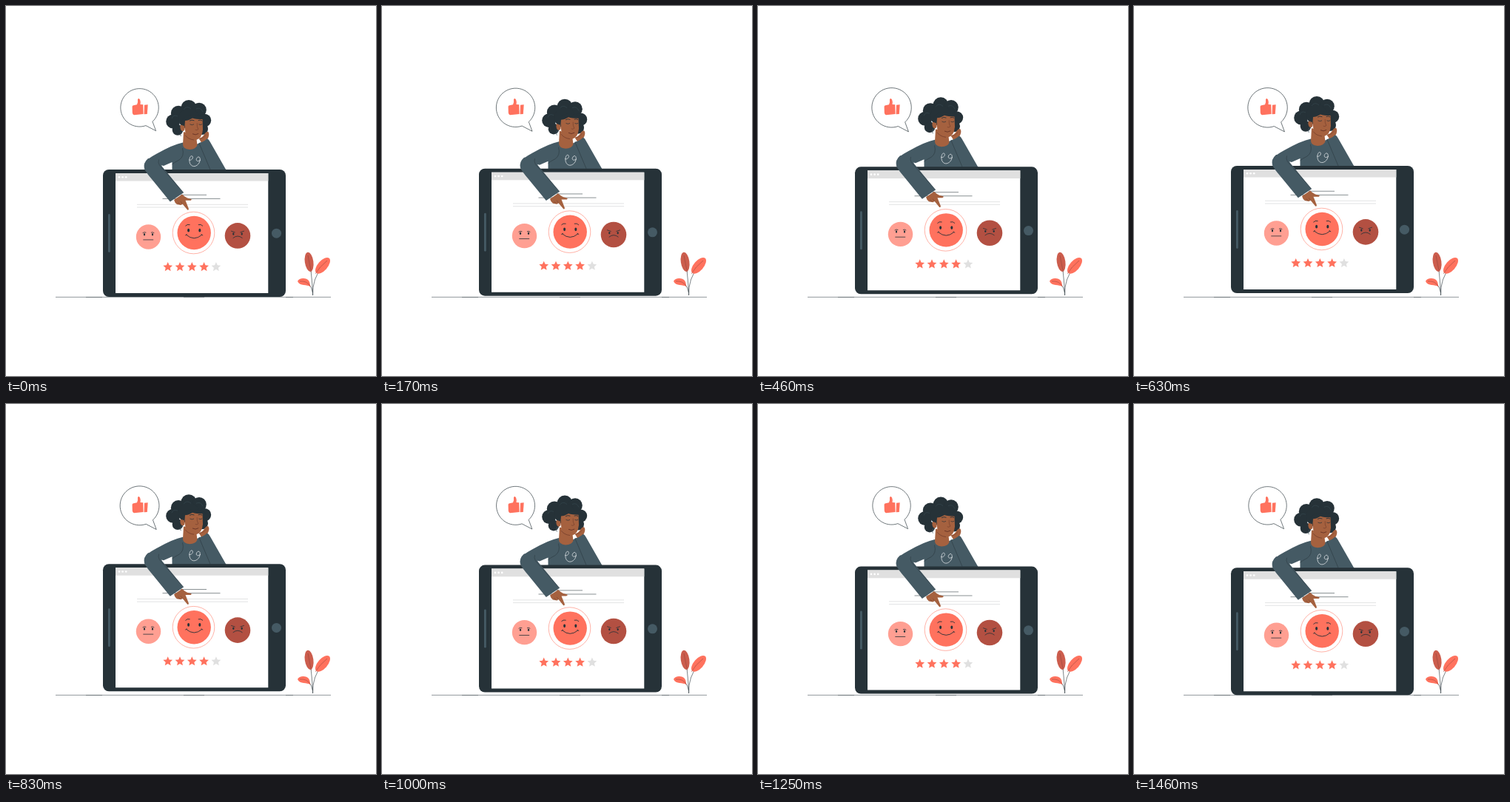
These frames come from a looping animation (500 px wide and 500 px high, 1.5 s). An HTML page with a canvas:

```html
<!DOCTYPE html>
<html lang="en">
<head>
<meta charset="utf-8">
<title>Feedback</title>
<style>
  html, body { margin: 0; width: 100%; height: 100%; overflow: hidden; background: #fff; }
  canvas { display: block; width: 500px; height: 500px; }
</style>
</head>
<body>
<canvas id="stage" width="500" height="500"></canvas>
<script>
const ctx = document.getElementById('stage').getContext('2d');
const LOOP = 1500, LIFT = 6;
const DARK = '#263238', SLATE = '#455a64', CORAL = '#ff725e', PALE = '#ff9f92',
      RUST = '#b35042', SKIN = '#a5613f', GREY = '#e0e0e0';

function fill(d, color) {
  ctx.fillStyle = color;
  ctx.fill(new Path2D(d));
}

function stroke(d, color = DARK, width = 0.6) {
  ctx.strokeStyle = color;
  ctx.lineWidth = width;
  ctx.stroke(new Path2D(d));
}

function ellipse(x, y, rx, ry, color, angle = 0) {
  ctx.beginPath();
  ctx.ellipse(x, y, rx, ry, angle * Math.PI / 180, 0, 2 * Math.PI);
  ctx.fillStyle = color;
  ctx.fill();
}

const disc = (x, y, r, color) => ellipse(x, y, r, r, color);

function roundRect(x, y, w, h, r, color) {
  ctx.beginPath();
  ctx.roundRect(x, y, w, h, r);
  ctx.fillStyle = color;
  ctx.fill();
}

function star(x, y, r, color) {
  ctx.beginPath();
  for (let i = 0; i < 10; i++) {
    const a = i * Math.PI / 5 - Math.PI / 2;
    const d = i % 2 ? r * 0.47 : r;
    ctx.lineTo(x + d * Math.cos(a), y + d * Math.sin(a));
  }
  ctx.closePath();
  ctx.fillStyle = color;
  ctx.fill();
}

function ground() {
  stroke('M67 393.4H439', DARK, 0.5);
  stroke('M108 393.6H130M240 393.6H268M378 393.6H388', DARK, 0.4);
}

function plant() {
  stroke('M414.6 391Q414 372 410.5 345M414.6 391Q413 370 429 349M414.4 387Q412 374 402 372.5', DARK, 0.6);
  ellipse(409.6, 345.8, 5.8, 13.2, '#cc5d4d', -8);
  ellipse(428, 350.8, 6.6, 13.2, CORAL, 41);
  fill('M394 372C396 367 406 367 409 371C411 374 411 377 411 379C407 376 397 379 394 372Z', CORAL);
  stroke('M408 337L412.5 360M434 344Q423 353 418 362M397 372Q407 371 411.5 379', '#8c4238', 0.5);
}

function bubble(scale) {
  ctx.save();
  ctx.translate(180.6, 137.2);
  ctx.scale(scale, scale);
  ctx.translate(-180.6, -137.2);
  const outline = 'M189 161.6A25.7 25.7 0 1 1 198 156.2L202.6 168.7Z';
  fill(outline, '#fff');
  stroke(outline, DARK, 0.65);
  ctx.restore();
  fill('M170.6 136Q170.6 134.4 172.4 134.2L177 133.3Q178.6 131 178 126.5Q178.2 124.8 179.6 125' +
       'Q181.4 125.8 181.7 129Q181.9 131.4 181.5 133L185.3 133.2L185.6 146L173.5 147.2' +
       'Q171 147 170.8 144Z', CORAL);
  fill('M187 133.8L191.7 133.2L190.8 146L186.6 146.3Z', CORAL);
}

function head() {
  const curls = [[247, 137.5, 10.5], [261, 140.5, 9.8], [233, 145, 10.2], [225.7, 156, 9.5],
                 [268.5, 154.5, 8.7], [232, 167.5, 7.3], [265, 166, 8], [247, 152, 14]];
  curls.forEach(([x, y, r]) => disc(x, y, r, DARK));
  fill('M240 170L239 187Q239 193 248 194Q257 193.5 258.5 188L257 176Z', SKIN);
  fill('M241 153Q252 147 265.5 152L266 167Q265 179 257 181Q248 181.5 242.5 174Z', SKIN);
  ellipse(238.5, 164.5, 3, 4.6, SKIN, -10);
  fill('M236 160Q238 148 250 147Q262 146 270 153Q258 153.5 252 151.5Q246 155 242 155Q241.5 161 240 162Z', DARK);
  stroke('M242 174.5Q246 180 254 181', '#703c2a', 0.7);
  stroke('M248 155.2Q251 153.2 254.4 154.8M259.7 154.6Q262.5 153.4 265.2 155', DARK, 0.9);
  stroke('M248.5 159.8Q251.5 161.5 254 159.8M260.5 159.8Q263 161.3 265.2 159.6', DARK, 0.7);
  stroke('M258.2 158Q257.7 163 259.8 166.6Q258 168.5 255.8 167.2', '#703c2a', 0.6);
  stroke('M252 172.7Q256 175.2 260.2 172.4', '#5d2d22', 0.8);
  stroke('M237.2 169.5Q234.8 174 236.5 176', SLATE, 0.8);
  stroke('M224 152Q226 146 232 149M240 140Q244 134 250 139M257 139Q263 136 266 143', SLATE, 0.35);
}

function body() {
  fill('M239 184.5Q248 192.5 258.5 186.5L264 184L298 222.5L224.5 222.5L224.5 211L213 216L190 210' +
       'Q190 207 203 200Q226 187 239 184.5Z', SLATE);
  head();
  fill('M260.5 179Q265 178 268 173.5Q271 168.5 273.5 170.2Q275.5 174 272.5 179.5L265 186Z', SKIN);
  stroke('M262 179.2Q268 178.5 270.5 173.5', '#703c2a', 0.5);
  fill('M260.8 185Q266 184.5 271.8 179.2Q274 180 276 184L298 222.5H276Z', SLATE);
  stroke('M260.8 185L276 221M238.5 192Q241.5 203 234 208Q228 211 224.5 214', DARK, 0.5);
  stroke('M247 207.5C249 210 254 206 251.8 203C248.6 200.8 246.5 209 249 213.5C252 218.5 258 217 261 212' +
         'C263.5 207 262 202.5 259 204.3C255 207.5 258 212 263 208', '#e4e9eb', 0.75);
}

function face(x, y, r, color, features, width) {
  disc(x, y, r, color);
  ctx.save();
  ctx.translate(x, y);
  ctx.lineCap = 'round';
  stroke(features, DARK, width);
  ctx.restore();
}

function eyes(x, y, gap, rx, ry) {
  ellipse(x - gap, y, rx, ry, DARK);
  ellipse(x + gap, y, rx, ry, DARK);
}

function tablet() {
  roundRect(131, 221, 247, 172, 8, DARK);
  roundRect(148, 226, 206.3, 162, 0, '#fff');
  roundRect(148, 226, 206.3, 10.6, 0, GREY);
  [153, 157.6, 162.2].forEach(x => disc(x, 231.3, 1.3, '#fff'));
  roundRect(138, 281, 2.8, 52, 1.4, SLATE);
  disc(365.5, 307.2, 6.5, SLATE);

  stroke('M236 255.3H271M211.5 260.4H289.5', DARK, 0.55);
  stroke('M177 268.3H327M177 272H327', DARK, 0.14);

  face(192.5, 312, 16.7, PALE, 'M-6.8 3.9H6.3M-7.6 -5.5Q-6 -7 -3.5 -6M3.8 -6Q6 -7 7.5 -5.5', 0.8);
  eyes(192.5, 308.7, 5.5, 1.1, 1.8);
  face(313, 310.4, 17.3, RUST, 'M-6 3Q0 -2 6.2 3M-8.5 -6.2L-3.8 -4.6M3.8 -4.6L8.5 -6.2', 0.8);
  eyes(313, 308, 5.7, 1.1, 1.7);
  face(254.2, 306.5, 22.7, CORAL,
       'M-10.5 2.8Q0 12 10.5 2.8M-11.6 3.3L-9.7 2.2M9.7 2.2L11.6 3.3M-11.5 -9.5Q-9.5 -12 -6 -11M6 -11Q9.5 -12 11.5 -9.5', 0.9);
  eyes(254.2, 303.2, 7.6, 1.5, 2.4);
  ctx.beginPath();
  ctx.arc(253.5, 306.5, 28.3, 0, 2 * Math.PI);
  ctx.strokeStyle = CORAL;
  ctx.lineWidth = 0.55;
  ctx.stroke();

  for (let i = 0; i < 5; i++) star(218.7 + i * 16.3, 352.7, 6.7, i < 4 ? CORAL : GREY);
}

function pointingArm() {
  fill('M227 262L238 254.5Q241 257.5 245 259.5L250.5 261Q251.2 262.8 248.5 262.8L242.5 262.8' +
       'Q244.2 267 246.9 274Q247 276.3 245.2 275.6L238.5 267.5L236.5 269L231 268Q228 266 227 262Z', SKIN);
  stroke('M238.5 267.5L236.2 264.2M235 268.2L232.7 265.4', '#703c2a', 0.5);
  fill('M192 206Q185 212 187 220Q190 226 197 234L221.8 264.4L240 252.2L211 217Q209 212 203 206Z', SLATE);
  stroke('M240 252.2L207.5 215.5Q205 211 206.5 207.5', DARK, 0.45);
}

function draw(now) {
  const t = now % LOOP;
  const phase = ((t + 35) % LOOP) / LOOP;
  const lift = LIFT * (1 - Math.abs(1 - 2 * phase));
  const pulse = t < 1100 ? 0.04 * Math.sin(Math.PI * t / 1100) : 0;

  ctx.fillStyle = '#fff';
  ctx.fillRect(0, 0, 500, 500);
  ground();
  plant();
  bubble(1 + pulse);
  ctx.save();
  ctx.translate(0, 0.3 - lift);
  body();
  tablet();
  pointingArm();
  ctx.restore();
}

const start = performance.now();
function tick() {
  draw(performance.now() - start);
  requestAnimationFrame(tick);
}
tick();
</script>
</body>
</html>
```
